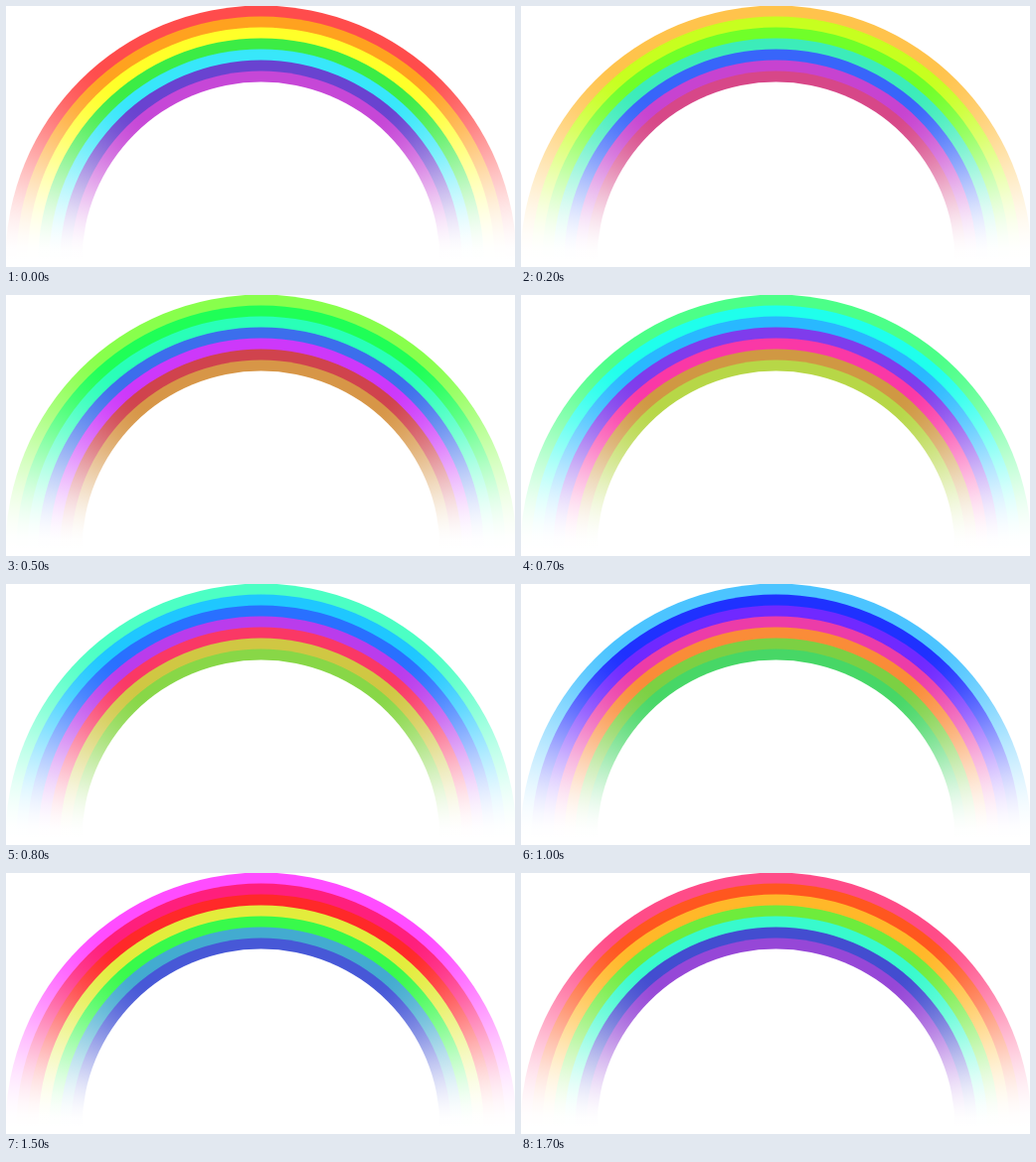
Recreate the animation shown at these times as an HTML page with a canvas. Size 512 by 263 pixels, loop 1800 ms.

```html
<!DOCTYPE html>
<html lang="en">
<head>
<meta charset="utf-8">
<title>Rainbow</title>
<style>
  html, body { margin: 0; width: 100%; height: 100%; overflow: hidden; background: #fff; }
  canvas { display: block; }
</style>
</head>
<body>
<canvas id="stage" width="512" height="263"></canvas>
<script>
const ctx = document.getElementById("stage").getContext("2d");
const LOOP = 1800, STEP = 100, HUE_STEP = 20;
const CX = 256.5, CY = 256.5, RADIUS = 257, BAND = 11;
const FADE_ANGLE = 52;

// Hue, saturation and lightness, from the outside in.
const colors = [
  [0, 100, 65], [35, 100, 56], [60, 100, 58], [123, 82, 58],
  [186, 95, 60], [256, 60, 54], [293, 64, 56]
];

function disc(radius, fill) {
  ctx.fillStyle = fill;
  ctx.beginPath();
  ctx.arc(CX, CY, radius, 0, Math.PI * 2);
  ctx.fill();
}

// White mist that thins out with the angle above the horizon on both sides.
function makeMist() {
  const mist = ctx.createConicGradient(Math.PI, CX, CY);
  const samples = 60;
  for (let i = 0; i <= samples; i++) {
    const angle = 180 * i / samples;
    const t = Math.min(1, Math.min(angle, 180 - angle) / FADE_ANGLE);
    const clear = t * t * (3 - 2 * t);
    mist.addColorStop(angle / 360, `rgba(255, 255, 255, ${(1 - clear).toFixed(4)})`);
  }
  return mist;
}
const mist = makeMist();

function draw(time) {
  const turn = Math.floor((time % LOOP) / STEP) * HUE_STEP;
  ctx.fillStyle = "#fff";
  ctx.fillRect(0, 0, 512, 263);
  colors.forEach(([hue, sat, light], i) => {
    disc(RADIUS - i * BAND, `hsl(${(hue + turn) % 360}, ${sat}%, ${light}%)`);
  });
  disc(RADIUS - colors.length * BAND, "#fff");
  ctx.fillStyle = mist;
  ctx.fillRect(0, 0, 512, 263);
}

let start;
function tick(now) {
  start ??= now;
  draw(now - start);
  requestAnimationFrame(tick);
}
draw(0);
requestAnimationFrame(tick);
</script>
</body>
</html>
```
